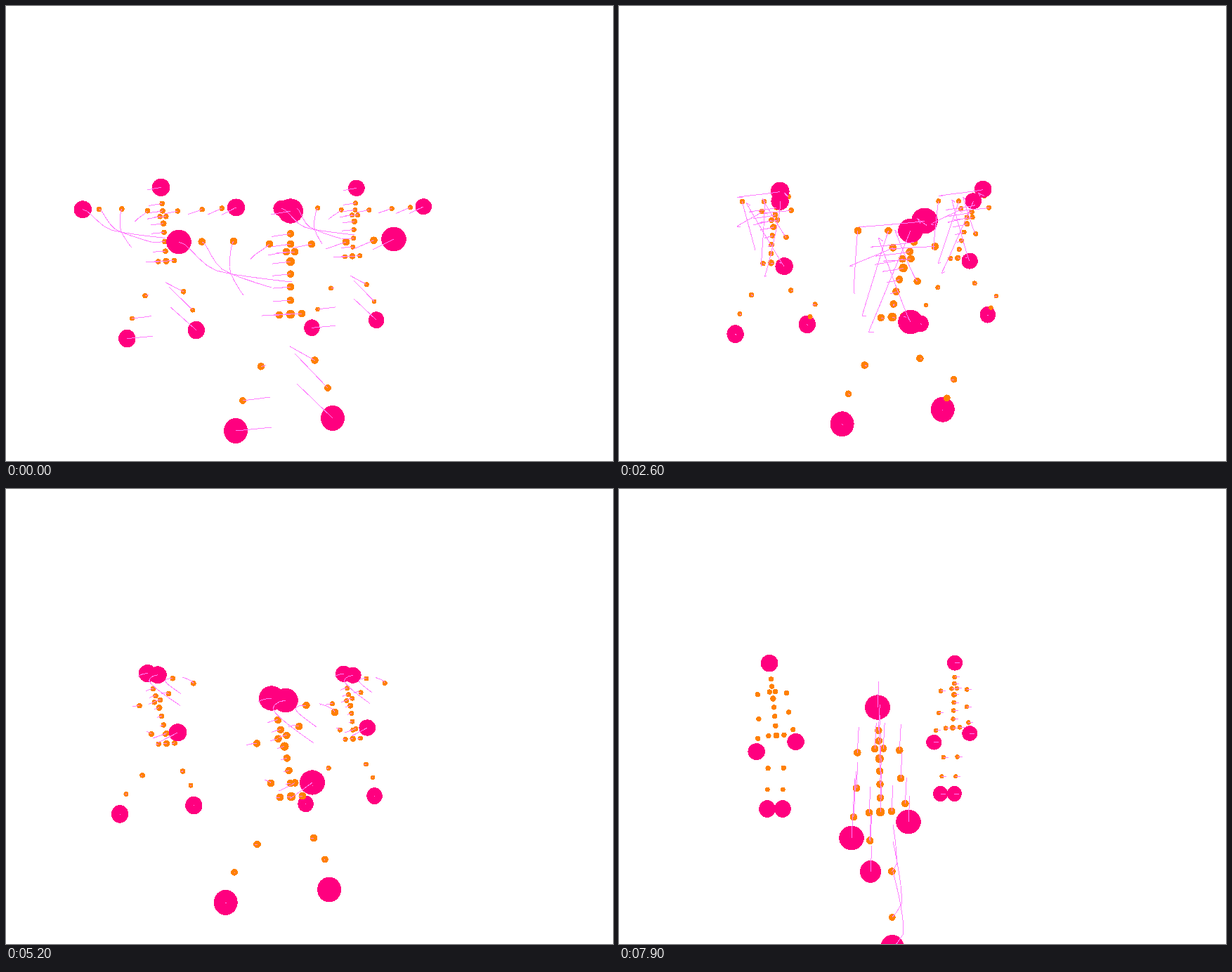
Animation, 864 px wide and 648 px high, one loop 8 s. Source, as an HTML page:

```html
<!DOCTYPE html>
<html lang="en">
<head>
<meta charset="utf-8">
<title>Three dancers</title>
<style>
html, body { margin: 0; width: 100%; height: 100%; overflow: hidden; background: #fff; }
svg { display: block; shape-rendering: crispEdges; }
.dot { fill: #ff8000; }
.big { fill: #ff007f; }
.trail { fill: none; stroke: #ff80ff; }
</style>
</head>
<body>
<svg id="stage" width="864" height="648" viewBox="0 0 864 648"></svg>
<script>
const LOOP = 8000, STEP = 100, CUT = 6700;
const TRAIL = 700, TRAIL_STEP = 70;

// One dance for all three. Keys are [time, x, y, depth], measured from the
// hips at rest; depth grows towards the viewer and is 0 when left out.
const dance = {
  pelvis: [[-700, -25, 0], [0, 0, -1], [1200, -7, -2], [2000, -12, 4], [3300, -19, 1],
    [5200, 1, -2], [6300, -30, 0]],
  head: [[-700, -28, -143], [0, 0, -148], [1200, -1, -145, 10], [1550, 3, -137], [2000, -65, -125, 15],
    [2600, 30, -134, 30], [3300, -22, -138, 50], [4500, -46, -137], [5200, -27, -142],
    [5600, 10, -115], [6000, -5, -38, 30], [6300, -13, -75, 60]],
  elbowL: [[-700, -67, -28], [-350, -87, -68], [0, -81, -105], [500, -59, -38], [1200, -30, -26, 20],
    [2000, -71, -32, -40], [2600, -65, -120], [3300, -62, -41], [5200, -28, -21], [6300, -64, -15, 40]],
  elbowR: [[-700, 50, -94], [0, 79, -104], [1200, 9, -29], [1500, 58, -53], [2000, 20, -137],
    [3300, 49, -116, 20], [4800, 42, -134], [5200, 63, -122], [6300, 10, -14]],
  handL: [[-700, 2, -47], [-350, -105, -63], [0, -159, -104], [150, -172, -100], [500, -100, 28],
    [1000, 0, 45, 50], [1200, 38, -36, 75], [1600, 13, 22, 30], [2000, -50, 25, -33],
    [2600, 10, -120], [3300, -37, 26, 40], [5200, 31, -22, 10], [5600, 50, -38],
    [6000, 28, 50, 40], [6300, 8, 24, 75]],
  handR: [[-700, 117, -93], [0, 147, -108], [500, 92, 17], [950, 9, 41, 20], [1200, -10, -82, 40],
    [1500, 30, -62, 20], [2000, -36, -110, 35], [2600, 10, 10], [3300, 16, -74, 70],
    [4500, 33, -78], [5000, -25, -128], [5200, -7, -139], [5600, 84, -54],
    [5750, 90, -10], [5900, 75, 45], [6020, 1, 85], [6220, -70, 25], [6300, -60, -19, 30]],
  footL: [[-700, -27, 160], [0, -78, 165], [2000, -86, 157], [6300, -93, 148]],
  footR: [[-700, 9, 98], [0, 60, 147], [2000, 56, 136], [6300, 55, 130]]
};
const stand = {
  pelvis: [[CUT, 0, 0]],
  head: [[CUT, -4, -149]],
  elbowL: [[CUT, -34, -34]], handL: [[CUT, -41, 36]],
  elbowR: [[CUT, 29, -48]], handR: [[CUT, 40, 14]],
  footL: [[CUT, -19, 163]], footR: [[CUT, 13, 163]]
};
const walk = {
  ...stand,
  handL: [[7200, -38, -11], [7900, -41, 37]],
  footL: [[CUT, -14, 85, -80]],
  footR: [[7200, 16, 122], [7750, 33, 176], [7900, 17, 193]]
};

// lean: sideways slant above and below the hips; turn, rise: shift by depth
const dancers = [
  { lean: [0.07, 0], turn: -0.45, rise: 0.15, leg: 0.93, takes: [
    { moves: dance, home: [[0, 228, 364]], scale: 0.714 },
    { moves: stand, home: [[0, 224, 351]], scale: 0.69 }] },
  { lean: [-0.06, -0.06], turn: 0, rise: 0.25, leg: 0.93, takes: [
    { moves: dance, home: [[0, 493, 357]], scale: 0.66 },
    { moves: stand, home: [[7200, 482, 340], [7900, 475, 340]], scale: 0.62 }] },
  { lean: [0, 0], turn: 0, rise: 0, leg: 1, takes: [
    { moves: dance, home: [[0, 405, 440]], scale: 1 },
    { moves: walk, home: [[7200, 374, 423], [7900, 372, 460]], scale: 1 }] }
];

const mix = (a, b, k) => a.map((v, i) => v + (b[i] - v) * k);
const shift = (p, x, y, z = 0) => [p[0] + x, p[1] + y, p[2] + z];
const point = ([, x, y, z = 0]) => [x, y, z];

// Monotone cubic through the keys: round paths without overshoot
function sample(keys, t) {
  const last = keys.length - 1;
  if (t <= keys[0][0]) return point(keys[0]);
  if (t >= keys[last][0]) return point(keys[last]);
  const i = keys.findIndex(k => k[0] > t) - 1;
  const h = keys[i + 1][0] - keys[i][0], u = (t - keys[i][0]) / h;
  const a = point(keys[i]), b = point(keys[i + 1]);
  const slope = (j, c) =>
    (point(keys[j + 1])[c] - point(keys[j])[c]) / (keys[j + 1][0] - keys[j][0]);
  const tangent = (j, c) => {
    if (j === 0 || j === last) return 0;
    const m = slope(j - 1, c), n = slope(j, c);
    return m * n <= 0 ? 0 : 2 * m * n / (m + n);
  };
  const ease = u * u * (3 - 2 * u);
  return a.map((v, c) => v + (b[c] - v) * ease
    + h * u * (1 - u) * ((1 - u) * tangent(i, c) - u * tangent(i + 1, c)));
}

// The right heel swings outwards while the body turns
function heelSwing(t) {
  const k = (t - 1200) / 2600;
  return k > 0 && k < 1 ? 25 * Math.sin(Math.PI * k) : 0;
}

// Builds every joint from the few that are led by keys
function rig(moves, t) {
  const at = name => sample(moves[name], t);
  const pelvis = at('pelvis'), head = at('head');
  const spine = u => {
    const bow = u ** 1.6;
    return pelvis.map((v, c) => v + (head[c] - v) * (c === 1 ? u : bow));
  };
  const neck = spine(0.78);
  const s = { neck, nape: spine(0.68), chest: spine(0.51),
    back1: spine(0.39), back2: spine(0.265), back3: spine(0.135), pelvis };
  for (const [side, dir] of [['L', -1], ['R', 1]]) {
    const elbow = at('elbow' + side), hand = at('hand' + side), foot = at('foot' + side);
    const shoulder = shift(neck, 30 * dir, 12 + 0.24 * (elbow[1] - neck[1]), 0.2 * elbow[2]);
    const hip = shift(pelvis, 16 * dir, -dir);
    const heel = dir > 0 ? heelSwing(t) : 0;
    const ankle = shift(foot, 0.16 * (hip[0] - foot[0]) + heel, -43);
    Object.assign(s, {
      ['shoulder' + side]: shoulder, ['elbow' + side]: elbow, ['wrist' + side]: mix(elbow, hand, 0.58),
      ['hip' + side]: hip, ['knee' + side]: shift(mix(hip, foot, 0.42), 0, 4), ['ankle' + side]: ankle,
      ['hand' + side]: hand, ['foot' + side]: foot
    });
    s['toe' + side] = heel > 12 ? mix(ankle, foot, 0.62) : foot;
  }
  const across = mix(s.shoulderL, s.shoulderR, 0.5);
  for (const side of 'LR') {
    const [x, y] = s['shoulder' + side];
    s['collar' + side] = shift(spine(0.605), 0.2 * (x - across[0]), 0.2 * (y - across[1]));
  }
  s.head = head;
  return s;
}

function project(d, take, t) {
  const joints = rig(take.moves, t), home = sample(take.home, t), k = take.scale;
  for (const name in joints) {
    const [x, y, z] = joints[name];
    const below = y > 0;
    const height = k * y * (below ? d.leg : 1);
    joints[name] = [
      home[0] + k * x + d.lean[+below] * height + d.turn * z,
      home[1] + height - d.rise * z,
      k * (1 + z / 700)
    ];
  }
  return joints;
}

const BIG = { head: [18, 17.7], hand: [17.8, 17.4], foot: [17, 18] };
const DOT = { pelvis: 6.5, chest: 6.2, ankle: 4.9, toe: 4.9 };
const kind = name => name.replace(/[LR]$/, '');

function radii(name) {
  const k = kind(name), r = DOT[k] || 5.3;
  return BIG[k] || [r, r];
}

function make(tag, cls, parent) {
  const el = document.createElementNS('http://www.w3.org/2000/svg', tag);
  if (cls) el.setAttribute('class', cls);
  return parent.appendChild(el);
}

// Small joints lie under the large ones; toes lie on top
const layer = name => kind(name) === 'toe' ? 2 : BIG[kind(name)] ? 1 : 0;
const names = Object.keys(rig(dance, 0)).sort((a, b) => layer(a) - layer(b));
const stage = document.getElementById('stage');
for (const d of dancers) {
  const group = make('g', '', stage);
  d.balls = names.map(n => make('ellipse', layer(n) === 1 ? 'big' : 'dot', group));
}
for (const d of dancers) d.trail = make('path', 'trail', stage);

function drawDancer(d, t) {
  const take = d.takes[t < CUT ? 0 : 1];
  const past = [];
  for (let ago = 0; ago <= TRAIL; ago += TRAIL_STEP) {
    if (t >= CUT && t - ago < CUT) break;
    past.push(project(d, take, t - ago));
  }
  const now = past[0];
  names.forEach((name, i) => {
    const [x, y, size] = now[name], [rx, ry] = radii(name);
    const side = name.slice(-1);
    const hidden = kind(name) === 'toe' && now[name].join() === now['foot' + side].join();
    const look = { cx: x, cy: y, rx: hidden ? 0 : rx * size, ry: ry * size };
    for (const key in look) d.balls[i].setAttribute(key, look[key].toFixed(2));
  });
  const line = name => 'M' + past.map(p => p[name].slice(0, 2).map(v => v.toFixed(1))).join('L');
  d.trail.setAttribute('d', names.filter(n => layer(n) < 2).map(line).join(''));
}

function frame(time) {
  const t = Math.floor(time % LOOP / STEP) * STEP;
  for (const d of dancers) drawDancer(d, t);
}

let start;
function tick(now) {
  start ??= now;
  frame(now - start);
  requestAnimationFrame(tick);
}
frame(0);
requestAnimationFrame(tick);
</script>
</body>
</html>
```
